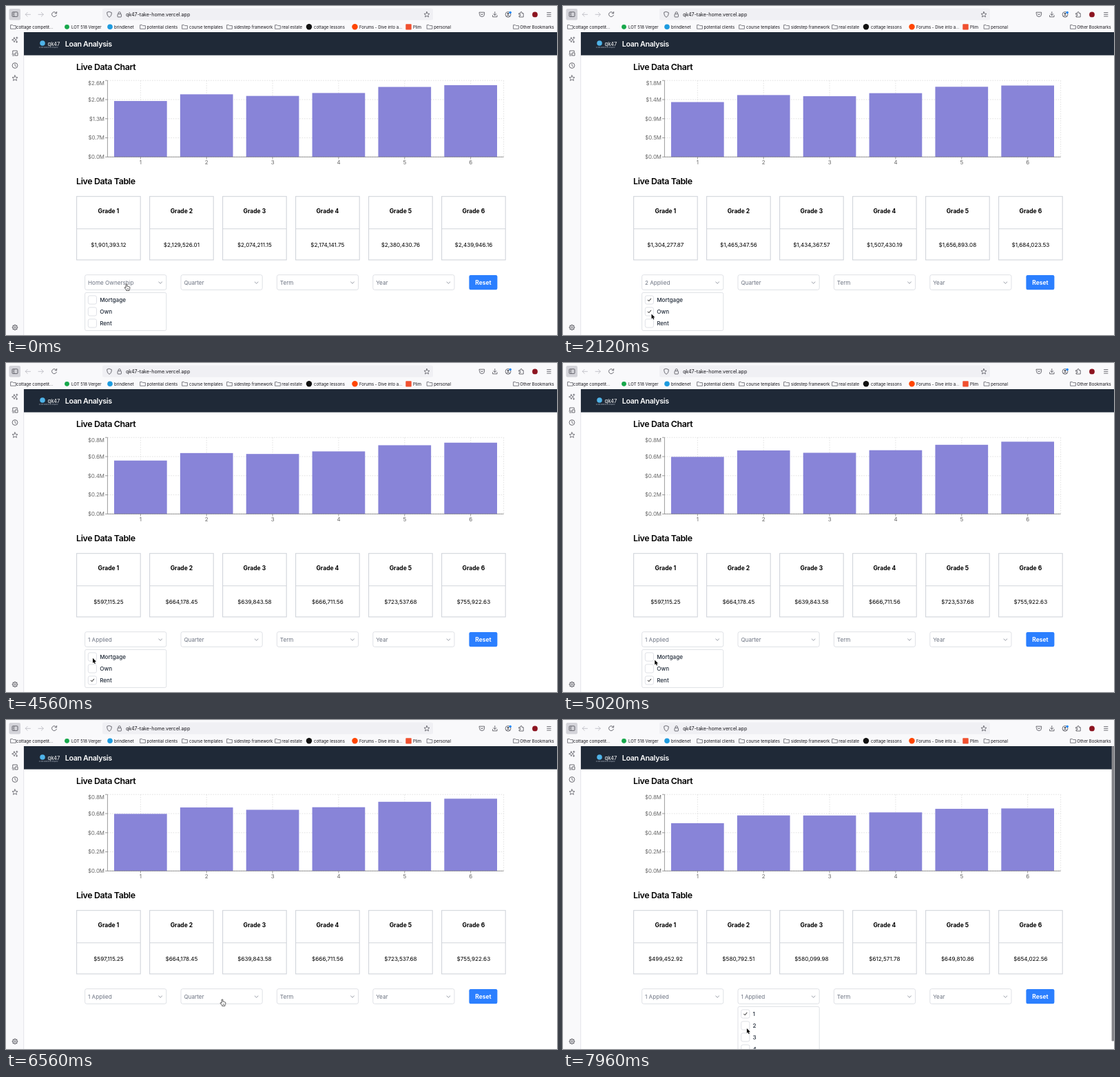
An HTML page for the animation above (8 s loop, 800x478 px).

```html
<!DOCTYPE html>
<html lang="en">
<head>
<meta charset="utf-8">
<title>Loan Analysis</title>
<style>
html, body { margin: 0; width: 100%; height: 100%; overflow: hidden; background: #fff; }
svg { display: block; width: 100vw; height: 100vh; }
text { font-family: Inter, "Liberation Sans", sans-serif; white-space: pre; }
.title { letter-spacing: -.03em; font-weight: 600; }
</style>
</head>
<body>
<svg id="stage" viewBox="0 0 800 478"></svg>
<script>
const LOOP = 8000, GROW = 460;
const stage = document.getElementById('stage');

function el(name, attrs, parent = stage) {
  const node = document.createElementNS(stage.namespaceURI, name);
  for (const key in attrs) node.setAttribute(key, attrs[key]);
  return parent.appendChild(node);
}
const group = (attrs = {}, parent) => el('g', attrs, parent);
const rect = (x, y, width, height, fill, extra, parent) =>
  el('rect', { x, y, width, height, fill, ...extra }, parent);
const circle = (cx, cy, r, fill, extra, parent) => el('circle', { cx, cy, r, fill, ...extra }, parent);
const line = (d, stroke, width = 0.8, extra, parent) =>
  el('path', { d, fill: 'none', stroke, 'stroke-width': width, ...extra }, parent);
function text(x, y, value, size, fill, extra, parent) {
  const node = el('text', { x, y, 'font-size': size, fill, ...extra }, parent);
  node.textContent = value;
  return node;
}
const middle = { 'text-anchor': 'middle' };
const round = { 'stroke-linecap': 'round', 'stroke-linejoin': 'round' };
const show = (node, on) => node.setAttribute('visibility', on ? 'visible' : 'hidden');
const setText = (node, value) => { if (node.textContent !== value) node.textContent = value; };

// ---------- browser chrome ----------
const INK = '#4a4a52', PALE = '#b9b9c0';
rect(0, 0, 800, 478, '#fff');
rect(0, 0, 800, 38, '#f9f9fb');
rect(0, 38, 26, 440, '#f9f9fb');
line('M25.7 38V478', '#dcdce2', 0.7);

rect(4.5, 4, 16.5, 16.5, '#d3d3d9', { rx: 2.2 });
rect(9, 8.8, 8, 6.6, 'none', { rx: 1, stroke: INK, 'stroke-width': 0.8 });
line('M11.7 9V15.2M10 11H11M10 12.8H11', INK, 0.6);
line('M35.5 12.3H28.3M31.2 9.3L28.2 12.3L31.2 15.3M47 12.3H54.2M51.3 9.3L54.3 12.3L51.3 15.3', PALE, 0.8, round);
line('M73 10.2A3.5 3.5 0 1 0 73.4 13.2M73.6 8.4V10.8H71.2', INK, 0.8, round);

rect(140, 3.6, 480, 17, '#f0f0f4', { rx: 2.4 });
line('M150 8.4L153.3 9.6C153.4 13 152.2 15.2 150 16.3C147.8 15.2 146.6 13 146.7 9.6Z', INK, 0.8, round);
rect(162, 11.6, 5.4, 4.4, 'none', { rx: 0.7, stroke: INK, 'stroke-width': 0.8 });
line('M163.1 11.5V10.2A1.6 1.6 0 0 1 166.3 10.2V11.5', INK);
text(174, 14.9, 'qk47-take-home.vercel.app', 7.1, '#15141a');

const STAR = [...Array(10)].map((_, i) => {
  const r = i % 2 ? 1.9 : 4.2, a = Math.PI * (i / 5 - 0.5);
  return (i ? 'L' : 'M') + (r * Math.cos(a)).toFixed(2) + ' ' + (r * Math.sin(a)).toFixed(2);
}).join('') + 'Z';
const star = (x, y) => line(STAR, INK, 0.7, { transform: `translate(${x} ${y})`, ...round });
star(611, 12.6);

line('M687.4 9.2H694.6V12A3.6 3.6 0 0 1 687.4 12ZM689.3 11.4L691 13L692.7 11.4', INK, 0.8, round);
line('M709.8 8.6V13.4M707.7 11.5L709.8 13.6L711.9 11.5M706.6 13.6V15.8H713V13.6', INK, 0.8, round);
circle(729, 12.4, 3.9, 'none', { stroke: INK, 'stroke-width': 0.8 });
circle(729, 11.3, 1.3, INK);
line('M726.7 14.6Q729 12.7 731.3 14.6', INK, 0.9);
circle(732.2, 9.4, 1.7, '#0a84ff');
line('M745 10.6H747V9.6A1.1 1.1 0 0 1 749.2 9.6V10.6H751.2V16H745V14.2H746.2A1 1 0 0 0 746.2 12.2H745Z', INK, 0.8, round);
circle(768, 12.4, 3.9, '#8c1420');
line('M785.2 9.6H791.4M785.2 12.3H791.4M785.2 15H791.4', INK, 0.8);

// ---------- bookmarks ----------
const folder = x => line(`M${x} 27.6H${x + 2.6}L${x + 3.5} 28.6H${x + 7.4}V33.2H${x}Z`, INK, 0.7, round);
const disc = (fill, r = 4.2) => x => circle(x + 4, 30.3, r, fill);
const square = fill => x => rect(x, 26.2, 8.4, 8.4, fill, { rx: 0.8 });
[
  [folder, 7, 15, 'cottage competit...'],
  [disc('#17a84b', 3.4), 84.5, 95, 'LOT 518 Verger'],
  [disc('#1d9bdf', 3.8), 147, 157, 'brindlenet'],
  [folder, 195, 204.5, 'potential clients'],
  [folder, 256, 266, 'course templates'],
  [folder, 321, 331, 'sidestep framework'],
  [folder, 391, 400.3, 'real estate'],
  [disc('#111'), 436, 447, 'cottage lessons'],
  [disc('#ff4500'), 502.5, 513, 'Forums - Dive into a...'],
  [square('#f0502f'), 580.3, 591, 'Plim'],
  [folder, 611.5, 621.3, 'personal'],
  [folder, 737, 746.3, 'Other Bookmarks'],
].forEach(([icon, x, tx, name]) => {
  icon(x);
  text(tx, 32.6, name, 6, '#15141a');
});

// ---------- sidebar ----------
line('M12 45.8L13 48.2L15.4 49.2L13 50.2L12 52.6L11 50.2L8.6 49.2L11 48.2ZM15.8 45V47.4M14.6 46.2H17M15.6 51V53.2M14.5 52.1H16.7', INK, 0.7, round);
line('M9.8 69V65H16.2V67M9 70H12M13.6 68H17V72H13.6ZM9.6 72H12', INK, 0.8, round);
circle(13, 86.5, 3.9, 'none', { stroke: INK, 'stroke-width': 0.8 });
line('M13 84.2V86.7L14.7 87.6', INK, 0.7, round);
star(13, 105);
circle(13, 467, 3.3, 'none', { stroke: INK, 'stroke-width': 0.9 });
circle(13, 467, 1.3, 'none', { stroke: INK, 'stroke-width': 0.7 });
for (let a = 0; a < 360; a += 45) line('M13 463.8V462.7', INK, 1.1, { transform: `rotate(${a} 13 467)` });

// ---------- page header ----------
rect(26, 38, 774, 33.6, '#1f2937');
circle(53, 54, 3.8, '#4fb3e8');
text(60.5, 57.8, 'qk47', 7.6, '#fff');
text(48, 60.6, 'a loan analytics company', 2.3, '#aab2bf');
text(85.7, 58.8, 'Loan Analysis', 10.7, '#fff', { class: 'title' });
text(102, 93.3, 'Live Data Chart', 12.4, '#000', { class: 'title' });
text(102, 259.4, 'Live Data Table', 12.4, '#000', { class: 'title' });

// ---------- chart ----------
const LEFT = 147.4, RIGHT = 722.6, TOP = 108.2, BASE = 219.3;
const BAND = (RIGHT - LEFT) / 6, HEIGHT = BASE - TOP;
const centre = i => LEFT + BAND * (i + 0.5);
const tickY = i => TOP + HEIGHT * i / 4;
const dash = { 'stroke-dasharray': '1.7 1.7' };
for (let i = 0; i < 5; i++) line(`M${LEFT} ${tickY(i)}H${RIGHT}`, '#ccc', 0.55, dash);
for (let i = 0; i < 6; i++) line(`M${centre(i)} ${TOP}V${BASE}`, '#ccc', 0.55, dash);
line(`M${RIGHT} ${TOP}V${BASE}`, '#ccc', 0.55, dash);
const bars = [...Array(6)].map((_, i) => rect(centre(i) - BAND * 0.4, BASE, BAND * 0.8, 0, '#8884d8'));
line(`M${LEFT} ${TOP}V${BASE}H${RIGHT}`, '#666', 0.65);
const ticks = [...Array(5)].map((_, i) => {
  line(`M${LEFT - 3.4} ${tickY(i)}H${LEFT}`, '#666', 0.65);
  return text(143, (i ? tickY(i) : 112) + 2.9, '', 7.9, '#666', { 'text-anchor': 'end' });
});
bars.forEach((_, i) => {
  line(`M${centre(i)} ${BASE}v3.3`, '#666', 0.65);
  text(centre(i), 230, i + 1, 7.9, '#666', middle);
});

// ---------- table ----------
const cells = bars.map((_, i) => {
  const x = 102.6 + 106 * i;
  rect(x, 276.7, 92.6, 92.2, '#fff', { stroke: '#d1d5db', 'stroke-width': 1.1 });
  line(`M${x} 323.8h92.6`, '#d1d5db', 1.1);
  text(x + 46.3, 301.4, 'Grade ' + (i + 1), 8.5, '#000', { ...middle, 'font-weight': 700 });
  return text(x + 46.3, 349.6, '', 8.15, '#000', middle);
});

// ---------- filters ----------
const BORDER = { stroke: '#d1d5db', 'stroke-width': 0.7 };
const selects = ['Home Ownership', 'Quarter', 'Term', 'Year'].map((name, i) => {
  const x = 114.6 + 139.4 * i;
  rect(x, 390.6, 118.2, 21.8, '#fff', { rx: 2.6, ...BORDER });
  line(`M${x + 107.2} 400.9l2.4 2.3l2.4 -2.3`, '#6b7280', 0.7, round);
  return text(x + 4.4, 404.8, name, 8.15, '#6b7280');
});
rect(672.4, 391, 41, 21.2, '#2b7fff', { rx: 2.2 });
text(692.9, 404.8, 'Reset', 8.4, '#fff', { ...middle, 'font-weight': 700 });

function dropdown(x, height, labels) {
  const root = group();
  rect(x, 416.4, 118.2, height, '#fff', { rx: 2.2, ...BORDER }, root);
  const marks = labels.map((label, i) => {
    const y = 427 + 17 * i;
    rect(x + 4.7, y - 6.1, 12.2, 12.2, '#fff', { rx: 2.4, ...BORDER }, root);
    text(x + 21.6, y + 3, label, 8.15, '#1f2937', { 'font-weight': 500 }, root);
    return line(`M${x + 8.7} ${y + 0.2}l1.5 1.6l2.8 -3.6`, '#111', 0.95, round, root);
  });
  return { root, marks };
}
const homeMenu = dropdown(114.6, 55.2, ['Mortgage', 'Own', 'Rent']);
const quarterMenu = dropdown(254, 74, ['1', '2', '3', '4']);
const scrollbar = rect(796.6, 38, 3.4, 428.6, '#858589', { rx: 1.2 });

// ---------- cursor ----------
const arrow = group();
el('path', { d: 'M0 0V7.1L1.6 5.6L2.7 8.2L3.9 7.7L2.8 5.2H5Z', fill: '#000', stroke: '#fff',
  'stroke-width': 0.8, 'paint-order': 'stroke' }, arrow);
const hand = group();
el('path', { d: 'M-.9 5.2V.7Q-.9 -.2 0 -.2T.9 .7V3.3Q2 2.7 2.4 3.6Q3.4 3.1 3.7 4Q4.8 3.7 4.8 4.8V6.4Q4.7 7.6 4 8.3V9.4H-.4V8.4L-2.8 5.6Q-3 4.5 -1.9 4.7Z',
  fill: '#fff', stroke: '#111', 'stroke-width': 0.7, 'stroke-linejoin': 'round' }, hand);
line('M1.1 6.2V8M2.5 6.2V8', '#111', 0.5, {}, hand);

// ---------- data ----------
const mortgage = [659538.86, 768730.34, 771930.22, 805753.32, 894099.55, 921555.09];
const rent = [597115.25, 664178.45, 639843.58, 666711.56, 723537.68, 755922.63];
const mortgageOwn = [1304277.87, 1465347.56, 1434367.57, 1507430.19, 1656893.08, 1684023.53];
const firstQuarter = [499452.92, 580792.51, 580099.98, 612571.78, 649810.86, 654022.56];
const add = (a, b) => a.map((v, i) => v + b[i]);
const all = add(mortgageOwn, rent);

// start time, values, axis maximum in millions
const phases = [
  [0, all, 2.6], [820, mortgage, 1], [1840, mortgageOwn, 1.8], [2840, all, 2.6],
  [3800, add(mortgage, rent), 1.8], [4560, rent, 0.8], [7500, firstQuarter, 0.8],
];
// checked from, checked until
const homeChecks = [[820, 4560], [1840, 3800], [2840, LOOP]];
const QUARTER_OPEN = 6580, QUARTER_PICK = 7500, HOME_CLOSE = 5700;

const smooth = p => p * p * (3 - 2 * p), speedUp = p => p * p, slowDown = p => 1 - (1 - p) ** 2;
// time, x, y, easing towards this point
const path = [
  [0, 175, 404], [20, 175, 404], [600, 126, 430], [1120, 126, 430], [1600, 128.5, 447.4],
  [2180, 128.5, 447.4], [2500, 127, 460], [2639, 127, 460], [2640, 127, 459.5], [3280, 127, 459.5],
  [3640, 125.5, 446], [3920, 125.5, 446], [4260, 126, 428.8], [4760, 126, 428.8],
  [5360, 164, 442.5, speedUp], [5540, 291, 440.6, slowDown], [6060, 291, 440.6],
  [6480, 314, 406], [6880, 314, 406], [7320, 266.4, 428], [7660, 266.4, 428], [7950, 266.9, 448], [LOOP, 266.9, 448],
];

function ease(x) {
  if (x >= 1) return 1;
  const bezier = (u, a, b) => 3 * u * (1 - u) ** 2 * a + 3 * u * u * (1 - u) * b + u ** 3;
  let low = 0, high = 1;
  for (let i = 0; i < 20; i++) {
    const mid = (low + high) / 2;
    if (bezier(mid, 0.25, 0.25) < x) low = mid; else high = mid;
  }
  return bezier(low, 0.1, 1);
}
const money = v => '$' + v.toFixed(2).replace(/\B(?=(\d{3})+\.)/g, ',');

function drawData(t) {
  const now = phases.findLastIndex(p => p[0] <= t);
  const [start, values, max] = phases[now];
  const [, oldValues, oldMax] = phases[Math.max(0, now - 1)];
  const k = ease((t - start) / GROW);
  values.forEach((v, i) => {
    const from = oldValues[i] / oldMax, to = v / max;
    const h = HEIGHT * (from + (to - from) * k) / 1e6;
    bars[i].setAttribute('y', BASE - h);
    bars[i].setAttribute('height', h);
    setText(cells[i], money(v));
  });
  ticks.forEach((tick, i) => setText(tick, `$${(max * (4 - i) / 4).toFixed(1)}M`));
}

function drawFilters(t) {
  const checks = homeChecks.map(([on, off]) => t >= on && t < off);
  const count = checks.filter(Boolean).length;
  const homeOpen = t < HOME_CLOSE, quarterOpen = t >= QUARTER_OPEN, picked = t >= QUARTER_PICK;
  setText(selects[0], count ? count + ' Applied' : 'Home Ownership');
  setText(selects[1], picked ? '1 Applied' : 'Quarter');
  show(homeMenu.root, homeOpen);
  homeMenu.marks.forEach((mark, i) => show(mark, homeOpen && checks[i]));
  show(quarterMenu.root, quarterOpen);
  quarterMenu.marks.forEach((mark, i) => show(mark, picked && i === 0));
  show(scrollbar, quarterOpen);
}

function drawCursor(t) {
  const next = path.findIndex(p => p[0] > t);
  const [t0, x0, y0] = path[next - 1], [t1, x1, y1, easing = smooth] = path[next];
  const k = easing((t - t0) / (t1 - t0));
  const x = x0 + (x1 - x0) * k, y = y0 + (y1 - y0) * k;
  const overSelect = y < 412.5;
  for (const node of [arrow, hand]) node.setAttribute('transform', `translate(${x} ${y})`);
  show(hand, overSelect);
  show(arrow, !overSelect);
}

const begin = performance.now();
function frame() {
  const t = Math.max(0, performance.now() - begin) % LOOP;
  drawData(t);
  drawFilters(t);
  drawCursor(t);
  requestAnimationFrame(frame);
}
frame();
</script>
</body>
</html>
```
